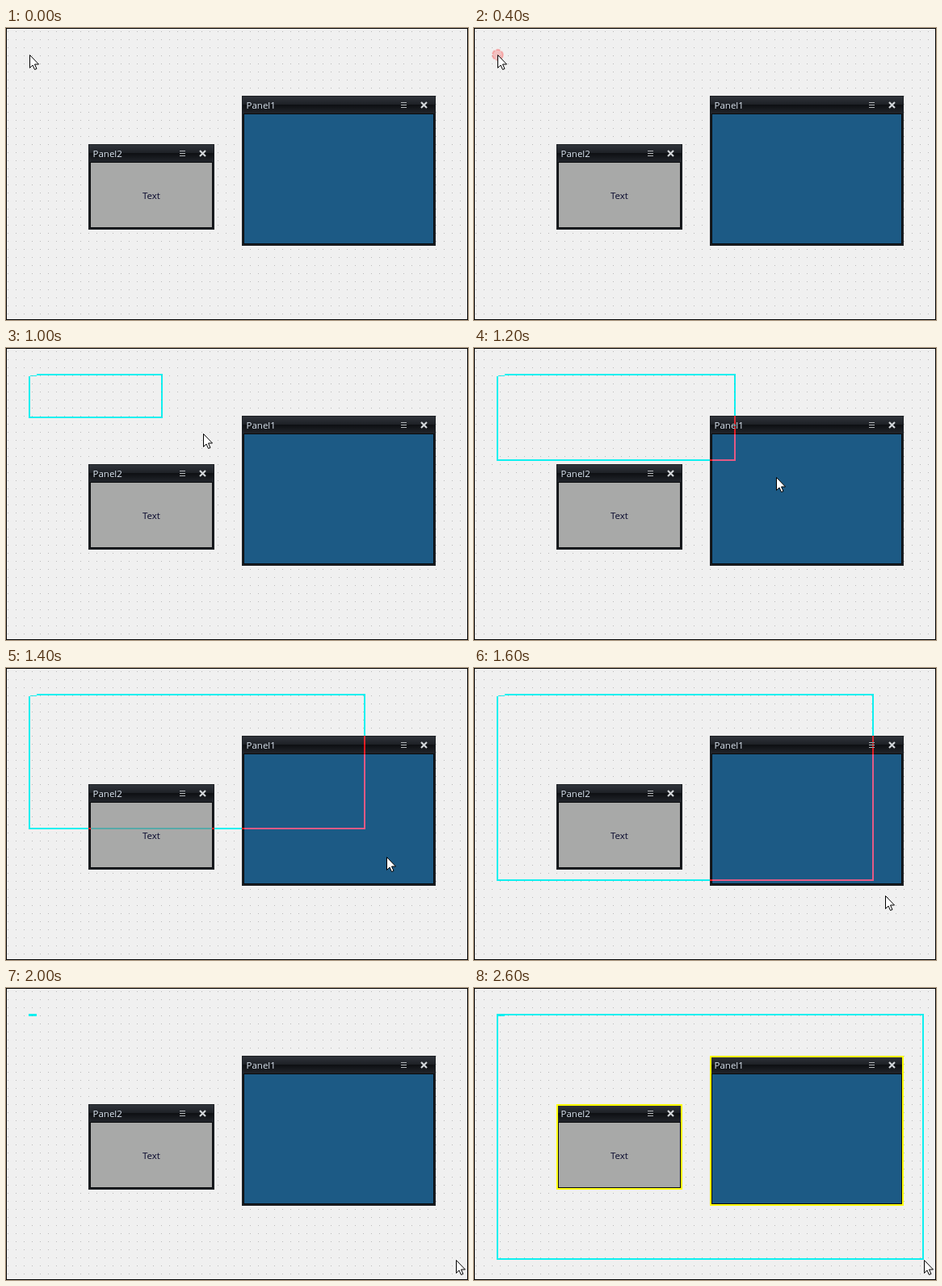
Write an HTML page that moves like this. It is 572 by 362 pixels and loops after 9.4 s.

```html
<!DOCTYPE html>
<html lang="en">
<head>
<meta charset="utf-8">
<title>Rubber band selection</title>
<style>
  html, body { margin: 0; width: 100%; height: 100%; overflow: hidden; background: #f0f0f0; }
  svg { display: block; }
  text { font: 11.5px "Open Sans", "Noto Sans", sans-serif; }
  .invert { mix-blend-mode: difference; }
</style>
</head>
<body>
<svg id="stage" width="572" height="362" viewBox="0 0 572 362">
  <defs>
    <pattern id="grid" x="2" y="4" width="10" height="10" patternUnits="userSpaceOnUse">
      <rect width="1" height="1" fill="#b9b9b9"/>
    </pattern>
    <linearGradient id="bar" x2="0" y2="1">
      <stop offset="0" stop-color="#30343b"/>
      <stop offset=".48" stop-color="#1d2025"/>
      <stop offset=".5" stop-color="#0e1013"/>
      <stop offset="1" stop-color="#22252b"/>
    </linearGradient>
  </defs>
  <rect width="572" height="362" fill="#f0f0f0"/>
  <rect width="572" height="362" fill="url(#grid)"/>
  <rect x=".5" y=".5" width="571" height="361" fill="none" stroke="#000"/>
  <g id="panels"></g>
  <rect id="band" class="invert" x="29" y="33" fill="none" stroke="#f00" stroke-width="2"/>
  <rect id="dash" class="invert" x="28" y="32" width="10" height="3" fill="#f00"/>
  <rect id="join" class="invert" x="30" y="34" width="8" height="1" fill="#f00"/>
  <circle id="ripple" cx="29.3" cy="33.3" fill="#f00" fill-opacity=".2"
          stroke="#f00" stroke-opacity=".22" stroke-width="2" stroke-dasharray="5 2"/>
  <path id="cursor" d="M.5 .5V16.5L4 13L6.5 18.5L9 17.5L6.5 12H11.5Z" fill="#fff" stroke="#000"/>
</svg>
<script>
const LOOP = 9400;
const $ = id => document.getElementById(id);

function panel(x, y, w, h, title, fill, label = '') {
  return `<g transform="translate(${x} ${y})">
    <rect width="${w}" height="${h}" fill="#1b1e22"/>
    <rect x="1" y="1" width="${w - 2}" height="21" fill="url(#bar)"/>
    <rect x="2.5" y="22.5" width="${w - 5}" height="${h - 25}" fill="${fill}" stroke="#08090b"/>
    <text x="5.5" y="15.5" fill="#dfe9f5">${title}</text>
    <path d="M${w - 43} 8.5h7m-7 3h7m-7 3h7" stroke="#b4b7ba"/>
    <path d="M${w - 18} 8l7 7m0 -7l-7 7" stroke="#d2d5d8" stroke-width="2.2"/>
    <text x="${w / 2}" y="68" fill="#08082c" text-anchor="middle">${label}</text>
    <rect class="mark" x="1" y="1" width="${w - 2}" height="${h - 2}"
          fill="none" stroke="#ff0" stroke-width="2"/>
  </g>`;
}

$('panels').innerHTML =
  panel(102, 144, 156, 106, 'Panel2', '#a8a9a8', 'Text') +
  panel(292, 84, 240, 186, 'Panel1', '#1c5a85');
const marks = document.querySelectorAll('.mark');

// Each step: start time, pointer tip, and the band's lower right corner
const steps = [
  { at: 0, tip: [29, 33] },
  { at: 400, tip: [29, 33], ripple: 6.5 },
  { at: 600, tip: [81, 46], ripple: 18, dash: true },
  { at: 800, tip: [122, 57], band: [106, 53], dash: true },
  { at: 1000, tip: [244, 106], band: [194, 87], dash: true },
  { at: 1200, tip: [374, 160], band: [324, 140], dash: true },
  { at: 1400, tip: [471, 234], band: [445, 200], dash: true },
  { at: 1600, tip: [509, 282], band: [495, 264], dash: true },
  { at: 1800, tip: [544, 325], band: [531, 312], dash: true },
  { at: 2000, tip: [557, 337], dash: true },
  { at: 2600, tip: [557, 337], band: [557, 337], done: true }
];

const show = (el, on) => el.setAttribute('visibility', on ? 'visible' : 'hidden');

function draw(time) {
  const s = steps.findLast(step => step.at <= time);
  $('cursor').setAttribute('transform', `translate(${s.tip})`);
  $('ripple').setAttribute('r', s.ripple || 0);
  show($('ripple'), s.ripple);
  show($('dash'), s.dash);
  show($('join'), s.done);
  show($('band'), s.band);
  if (s.band) {
    $('band').setAttribute('width', s.band[0] - 30);
    $('band').setAttribute('height', s.band[1] - 34);
  }
  marks.forEach(m => show(m, s.done));
}

let start;
function tick(now) {
  start ??= now;
  draw((now - start) % LOOP);
  requestAnimationFrame(tick);
}
draw(0);
requestAnimationFrame(tick);
</script>
</body>
</html>
```
